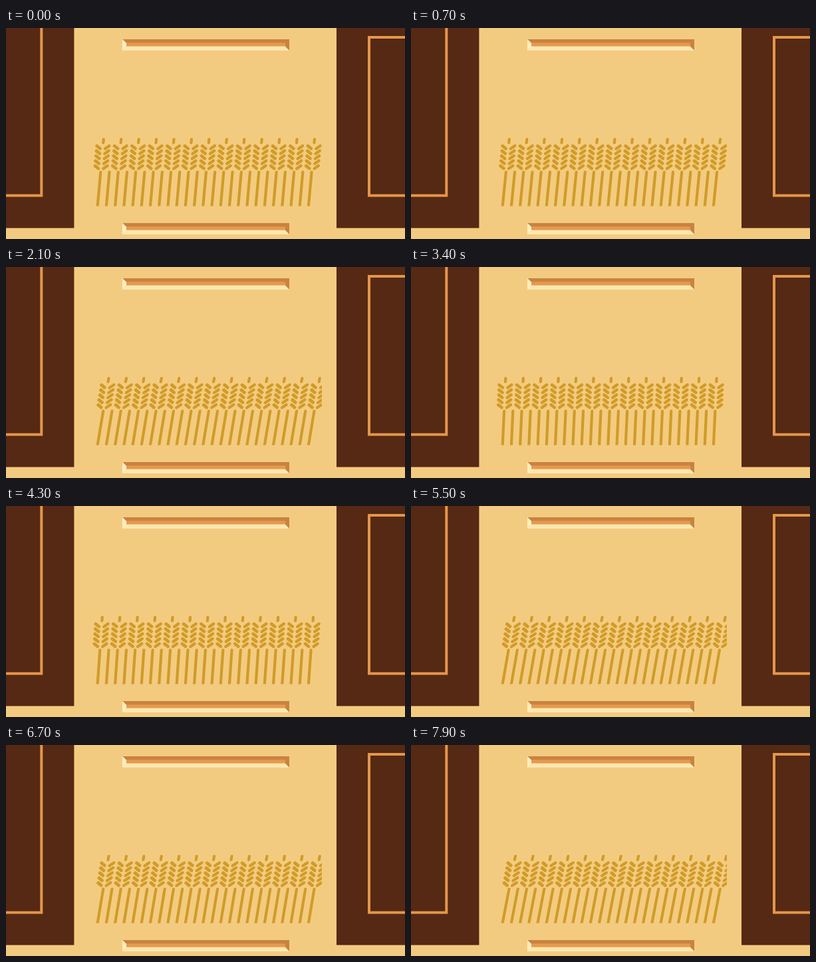
Recreate the animation shown at these times as an HTML page. Size 600 px wide and 318 px high, loop 8000 ms.

```html
<!DOCTYPE html>
<html lang="en">
<head>
<meta charset="utf-8">
<title>Wheat in the wind</title>
<style>
html, body { margin: 0; width: 100%; height: 100%; overflow: hidden; background: #f3cb80; }
svg { display: block; width: 100vw; height: 100vh; }
</style>
</head>
<body>
<svg viewBox="0 0 600 318">
  <defs>
    <clipPath id="field"><rect x="124" y="58" width="351" height="210.5"/></clipPath>
    <g id="bar">
      <path fill="#c98340" d="M175 17H426V34L419.5 27.4V22.7H181Z"/>
      <path fill="#fbe8b0" d="M175 34L181 27.4H419.5L426 34Z"/>
      <path fill="#fdedc0" d="M175 17L181 22.7V27.4L175 34Z"/>
      <path fill="#e8984d" d="M181 22.7H419.5V27.4H181Z"/>
    </g>
  </defs>
  <rect width="600" height="318" fill="#f3cb80"/>
  <path fill="#552913" d="M0 0H102.4V301.5H0ZM497 0H600V301.5H497Z"/>
  <path fill="none" stroke="#e5964b" stroke-width="4" d="M0 252.5H53.3V0M600 14H546V252.5H600"/>
  <use href="#bar"/>
  <use href="#bar" y="277"/>
  <g clip-path="url(#field)">
    <g id="wheat" fill="none" stroke="#d19b27" stroke-linecap="round">
      <path id="stems" stroke-width="4.2"/>
      <path id="leaves" stroke-width="4.5"/>
    </g>
  </g>
</svg>
<script>
const LOOP = 8000, STEP = 100;
const BASE = 268, LEFT = 137.7, GAP = 13.22, STEMS = 25;
const byId = id => document.getElementById(id);

// Turning points of the sway: [ms, offset of the ear tips in px]
const turns = [
  [0, 8.8], [550, 10.2], [1050, 8.4], [2200, 16.5], [2850, 5.8], [3800, 3.7],
  [5400, 17.3], [6100, 14.6], [6600, 16.6], [7450, 9.4], [7950, 19]
];

function sway(t) {
  const i = Math.max(1, turns.findIndex(turn => turn[0] >= t));
  const [t0, from] = turns[i - 1], [t1, to] = turns[i];
  const u = (t - t0) / (t1 - t0);
  return from + (to - from) * u * u * (3 - 2 * u);
}

function line(x1, y1, x2, y2) {
  return `M${x1} ${y1 - BASE}L${x2} ${y2 - BASE}`;
}

let stems = "", leaves = "";
for (let i = 0; i < STEMS; i++) {
  const x = LEFT + i * GAP;
  stems += line(x, 217.2, x, 274);
  if (i % 2) continue;
  stems += line(x, 167.7, x, 173);
  for (let row = 0; row < 5; row++) {
    const y = 177.6 + row * 7.5;
    for (const side of [-1, 1]) leaves += line(x + side * 9.3, y, x + side * 3.8, y + 4.2);
  }
}
byId("stems").setAttribute("d", stems);
byId("leaves").setAttribute("d", leaves);

function draw(ms) {
  const t = Math.floor((ms % LOOP) / STEP) * STEP;
  const skew = -sway(t) / 98;
  byId("wheat").setAttribute("transform", `matrix(1 0 ${skew.toFixed(5)} 1 0 ${BASE})`);
}

let start = null;
function tick(now) {
  if (start === null) start = now;
  draw(now - start);
  requestAnimationFrame(tick);
}
draw(0);
requestAnimationFrame(tick);
</script>
</body>
</html>
```
